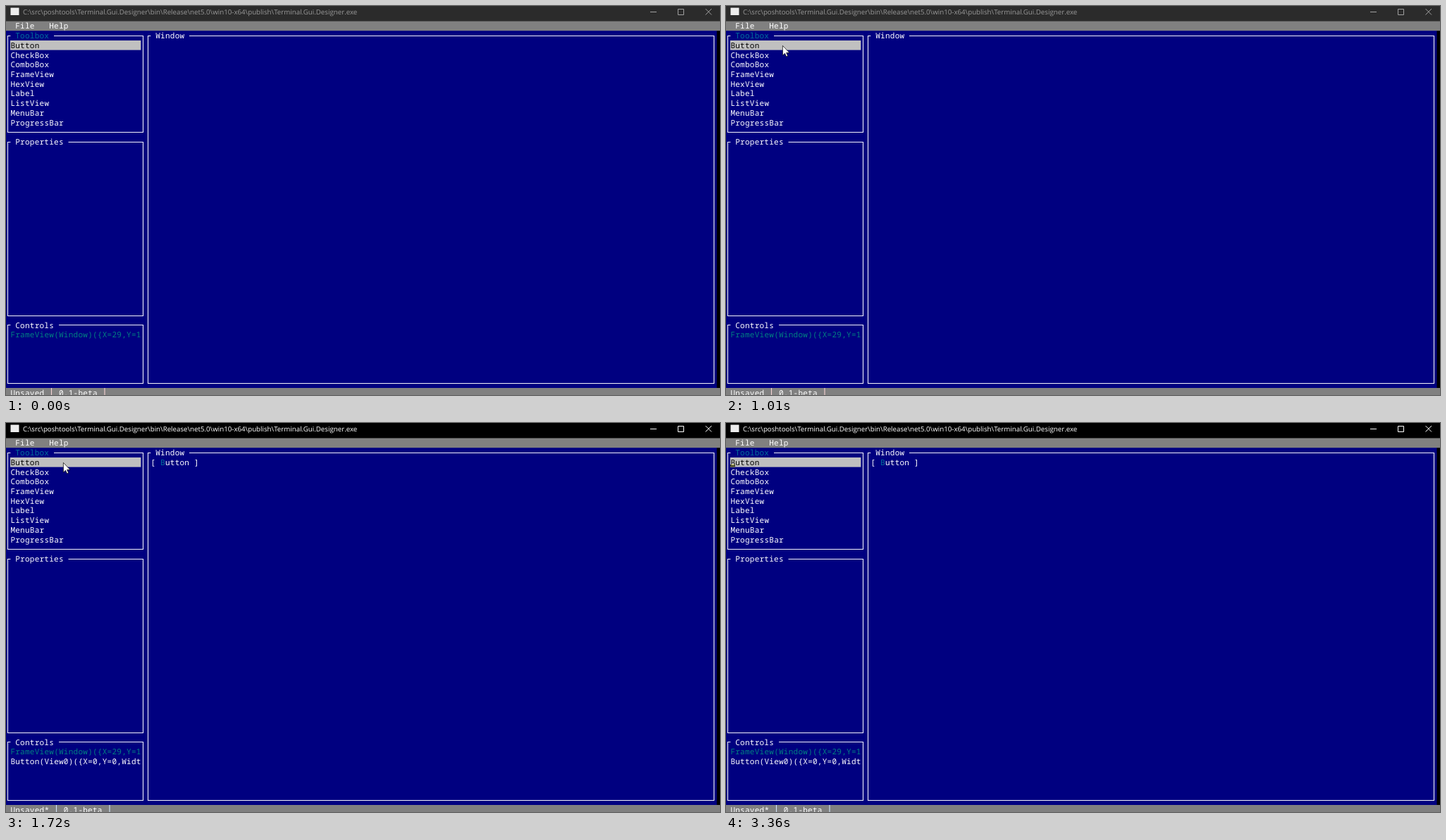
An HTML page that plays this animation: 1013 by 553 pixels, repeating every 3440 ms.

```html
<!DOCTYPE html>
<html lang="en">
<head>
<meta charset="utf-8">
<title>Terminal designer</title>
<style>
  html, body { margin: 0; width: 100%; height: 100%; overflow: hidden; background: #000; }
  svg { display: block; width: 100vw; height: 100vh; }
  text { fill: #fff; white-space: pre; text-rendering: geometricPrecision; }
  .term { font: 11px "Noto Sans Mono", "DejaVu Sans Mono", monospace; letter-spacing: .26px; }
  .title { font: 9.73px "Open Sans", "Noto Sans", sans-serif; }
  .lines { fill: none; stroke: #f4f4fa; stroke-width: 1.1; }
  .teal { fill: #008080; }
  .hot { fill: #00709a; }
  .dark { fill: #000; }

  .idle, .active, .before, .after, .halo, .caret, .mouse {
    animation: 3440ms step-end infinite;
  }
  .idle { animation-name: idle; }
  .active { animation-name: active; }
  .before { animation-name: before; }
  .after { animation-name: after; }
  .halo { animation-name: halo; }
  .caret { animation-name: caret; mix-blend-mode: difference; }
  .mouse { animation-name: mouse; }

  @keyframes idle { 0% { visibility: visible } 33.42%, 100% { visibility: hidden } }
  @keyframes active { 0% { visibility: hidden } 33.42%, 100% { visibility: visible } }
  @keyframes before { 0% { visibility: visible } 38.65%, 100% { visibility: hidden } }
  @keyframes after { 0% { visibility: hidden } 38.65%, 100% { visibility: visible } }
  @keyframes halo {
    0% { visibility: hidden; transform: translate(79.5px, 56px) }
    33.42% { visibility: visible; transform: translate(79.5px, 56px) }
    36.04% { visibility: visible; transform: translate(81px, 56px) }
    40.98%, 100% { visibility: hidden; transform: translate(81px, 56px) }
  }
  @keyframes caret {
    0%, 49.99%, 81.68% { visibility: hidden }
    38.65%, 65.69%, 97.67%, 100% { visibility: visible }
  }
  @keyframes mouse {
    0% { visibility: hidden; transform: translate(943px, 541px) }
    6.1% { visibility: visible; transform: translate(943px, 541px) }
    8.42% { visibility: visible; transform: translate(692px, 411px) }
    10.46% { visibility: visible; transform: translate(487px, 305px) }
    12.78% { visibility: visible; transform: translate(327px, 223px) }
    15.11% { visibility: visible; transform: translate(213px, 164px) }
    17.15% { visibility: visible; transform: translate(145px, 129px) }
    19.47% { visibility: visible; transform: translate(122px, 117px) }
    22.09% { visibility: visible; transform: translate(112px, 100px) }
    24.41% { visibility: visible; transform: translate(98px, 80px) }
    26.74% { visibility: visible; transform: translate(86px, 63px) }
    29.35% { visibility: visible; transform: translate(80px, 56px) }
    36.04% { visibility: visible; transform: translate(81px, 56px) }
    65.69% { visibility: visible; transform: translate(222px, 183px) }
    68.02% { visibility: visible; transform: translate(628px, 484px) }
    70.05%, 100% { visibility: hidden; transform: translate(628px, 484px) }
  }
</style>
</head>
<body>
<svg viewBox="0 0 1013 553">
  <defs>
    <g id="bar">
      <text class="title" x="24" y="12.3" style="fill:inherit">C:\src\poshtools\Terminal.Gui.Designer\bin\Release\net5.0\win10-x64\publish\Terminal.Gui.Designer.exe</text>
      <path d="M914 8.5h9M953.5 4.5h8v8h-8zM992.5 4l8.5 8.5M1001 4l-8.5 8.5" fill="none"/>
    </g>
  </defs>

  <!-- title bar -->
  <rect width="1013" height="553"/>
  <g class="idle">
    <rect width="1013" height="21.5" fill="#2b2b2b"/>
    <use href="#bar" fill="#999" stroke-width="0"/>
    <path d="M914 8.5h9M953.5 4.5h8v8h-8zM992.5 4l8.5 8.5M1001 4l-8.5 8.5" fill="none" stroke="#a0a0a0"/>
  </g>
  <g class="active">
    <use href="#bar" fill="#fff" stroke-width="0"/>
    <path d="M914 8.5h9M953.5 4.5h8v8h-8zM992.5 4l8.5 8.5M1001 4l-8.5 8.5" fill="none" stroke="#fff"/>
  </g>
  <rect x="6.5" y="2.5" width="12" height="10.5" fill="#eee"/>

  <!-- panels -->
  <rect y="35" width="1008.5" height="508" fill="#000080"/>
  <rect y="21.5" width="1013" height="13.7" fill="#808080"/>
  <rect y="543" width="1013" height="10" fill="#808080"/>
  <rect x="6" y="49" width="185.4" height="13.6" fill="#c0c0c0"/>
  <g class="lines">
    <path d="M6.4 42.5H2.5V179.5H194.5V42.5H68"/>
    <path d="M6.4 193.5H2.5V440.5H194.5V193.5H88.5"/>
    <path d="M6.4 453.5H2.5V536.5H194.5V453.5H75"/>
    <path d="M205.3 42.5H201.5V536.5H1004.5V42.5H260"/>
  </g>

  <g class="term">
    <text x="13.2" y="32.3">File</text>
    <text x="61.2" y="32.3">Help</text>
    <text class="hot" x="13.2" y="46">Toolbox</text>
    <text x="212.2" y="46">Window</text>
    <text class="dark" x="6.4" y="59.7">Button</text>
    <text x="6.4" y="73.5">CheckBox</text>
    <text x="6.4" y="87.2">ComboBox</text>
    <text x="6.4" y="100.9">FrameView</text>
    <text x="6.4" y="114.6">HexView</text>
    <text x="6.4" y="128.3">Label</text>
    <text x="6.4" y="142.1">ListView</text>
    <text x="6.4" y="155.8">MenuBar</text>
    <text x="6.4" y="169.5">ProgressBar</text>
    <text x="13.2" y="196.9">Properties</text>
    <text x="13.2" y="457.6">Controls</text>
    <text class="teal" x="6.4" y="471.3">FrameView(Window)({X=29,Y=1</text>

    <g class="before">
      <text x="6.4" y="553.7">Unsaved</text>
      <text x="75" y="553.7">0.1-beta</text>
      <path d="M64.5 543v10M140 543v10" stroke="#f6d4d4" stroke-width="1.1"/>
    </g>
    <g class="after">
      <text x="205.3" y="59.7">[ <tspan class="hot">B</tspan>utton ]</text>
      <text x="6.4" y="485.1">Button(View0)({X=0,Y=0,Widt</text>
      <text x="6.4" y="553.7">Unsaved*</text>
      <text x="81.8" y="553.7">0.1-beta</text>
      <path d="M71.5 543v10M147 543v10" stroke="#cfe2f6" stroke-width="1.1"/>
    </g>
  </g>

  <rect class="caret" x="6" y="59" width="7" height="3.6" fill="#ffff90"/>
  <circle class="halo" r="10.5" fill="#e4dc2c" fill-opacity=".85"/>
  <path class="mouse" d="M.4.4V14.2L3.5 11.3 5.6 16 7.7 15.1 5.6 10.5H10z" fill="#fff" stroke="#000" stroke-width=".7"/>
</svg>
</body>
</html>
```
